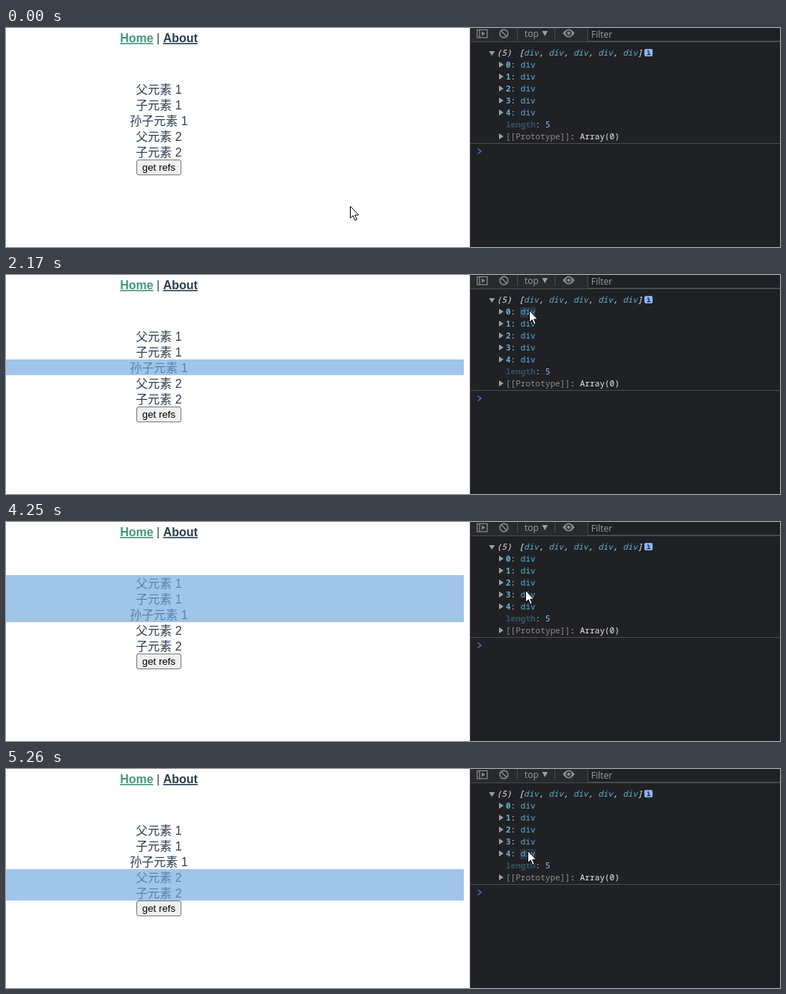
An HTML page that plays this animation: 1033x293 px, repeating every 5990 ms.

```html
<!DOCTYPE html>
<html lang="zh">
<head>
<meta charset="utf-8">
<title>get refs</title>
<style>
  html, body { margin: 0; width: 100%; height: 100%; overflow: hidden; background: #fff; }
  svg { display: block; }
  text { white-space: pre; }
  .page { font: 16px "Liberation Sans", "Noto Sans CJK SC", "Noto Sans CJK", sans-serif; fill: #2c3e50; text-anchor: middle; }
  .link { font-weight: bold; text-decoration: underline; }
  .ui { font: 12px "Open Sans", sans-serif; fill: #9aa0a6; }
  .console { font: 11px "Noto Sans Mono", monospace; fill: #e8eaed; }
  .node { fill: #5db0d7; }
  .key { fill: #5db0d7; font-weight: bold; }
  .grey { fill: #9aa0a6; }
  .line { fill: none; stroke: #494c50; }
  .icon { fill: none; stroke: #85898e; stroke-width: 1.6; }
</style>
</head>
<body>
<svg width="1033" height="293" viewBox="0 0 1033 293">
  <g class="page">
    <text x="204" y="19"><tspan class="link" fill="#42977b">Home</tspan> | <tspan class="link">About</tspan></text>
    <g id="lines"></g>
    <rect x="174.5" y="176.5" width="59" height="20" rx="2.5" fill="#efefef" stroke="#767676"/>
    <text x="204" y="191" font-size="13.33" fill="#000">get refs</text>
  </g>
  <rect id="overlay" width="611" fill="#6fa8dc" fill-opacity=".66"/>

  <rect x="619" width="414" height="293" fill="#202124"/>
  <rect x="619" width="414" height="18" fill="#292a2d"/>
  <rect x="776.5" y="-4" width="260" height="21.5" fill="#202124" stroke="#494c50"/>
  <path class="line" d="M619.5 0V293M620 18.5H1033M682.5 0V15M732.5 0V15M620 154.5H1033"/>
  <g class="icon">
    <path d="M628.8 2.3H642.2V12.8H628.8ZM632 2V13" stroke-width="1.3"/>
    <path d="M635 4.5V10.5L639.5 7.5Z" fill="#85898e" stroke="none"/>
    <circle cx="664.5" cy="7.5" r="5.4"/>
    <path d="M660.8 3.7L668.3 11.3"/>
  </g>
  <path d="M743 7Q751-4 759 7Q751 18 743 7Z" fill="#85898e"/>
  <circle cx="751" cy="7" r="2.9" fill="#85898e" stroke="#292a2d" stroke-width="1.5"/>
  <text class="ui" x="692" y="12">top</text>
  <path class="grey" d="M715.5 4H723L719.2 11Z"/>
  <text class="ui" x="781" y="13">Filter</text>

  <rect id="hover" x="686" width="21" height="14" fill="#283443"/>
  <g class="console">
    <path class="grey" d="M644.5 31H652.5L648.5 37Z"/>
    <g font-style="italic">
      <text x="655" y="37">(5)</text>
      <text id="preview" x="684.5" y="37"></text>
    </g>
    <rect x="852" y="28" width="11" height="10" rx="2" fill="#8ab4f8"/>
    <path d="M856 31.8H858V35.7M855.5 35.7H860M857 29.3V30.5" fill="none" stroke="#202124" stroke-width="1.2"/>
    <g id="rows"></g>
    <text x="667" y="133"><tspan class="key" opacity=".6" fill-opacity=".6">length</tspan>: <tspan fill="#9abbf5">5</tspan></text>
    <path class="grey" d="M658 141V149L664 145Z"/>
    <text x="667" y="149"><tspan fill="#918b98">[[Prototype]]</tspan>: Array(0)</text>
  </g>
  <path d="M629.5 161.5L634 165L629.5 168.5" fill="none" stroke="#4079d0" stroke-width="1.5"/>
  <path id="cursor" d="M.5 .5V16.5L4.2 13L6.8 19.3L9.3 18.2L6.7 12.2H11.6Z" fill="#fff" stroke="#000"/>
</svg>
<script>
const LOOP = 5990, LAG = 70, ROW_TOP = 41, ROW_HEIGHT = 16;
const $ = id => document.getElementById(id);

$('lines').innerHTML = ['父元素 1', '子元素 1', '孙子元素 1', '父元素 2', '子元素 2']
  .map((label, i) => `<text x="204" y="${88 + 21 * i}">${label}</text>`).join('');
const node = '<tspan class="node">div</tspan>';
$('preview').innerHTML = `[${Array(5).fill(node).join(', ')}]`;
$('rows').innerHTML = [0, 1, 2, 3, 4].map(i => {
  const y = 49 + ROW_HEIGHT * i;
  return `<path class="grey" d="M658 ${y - 4}v8l6-4Z"/>
    <text x="667" y="${y + 4}"><tspan class="key">${i}</tspan>: ${node}</text>`;
}).join('');

// Page area (top, bottom) of the element behind each console row
const areas = [[113, 134], [92, 134], [71, 134], [155, 176], [134, 176]];

// Bursts of pointer movement: start ms, ms per step, waypoints [step, x, y]
const bursts = [
  [0, 70, [[1, 459, 238]]],
  [250, 78, [[1, 458, 241], [2, 450, 230], [4, 415, 185], [7, 360, 122], [8, 339, 107]]],
  [860, 91, [[1, 318, 98], [3, 266, 78], [4, 260, 70], [5, 280, 61], [7, 364, 51]]],
  [1480, 70, [[1, 420, 45], [4, 600, 35], [7, 672, 41], [8, 690, 45], [9, 696, 47]]],
  [2170, 70, [[1, 698, 47]]],
  [2570, 70, [[1, 698, 45], [2, 698, 42], [4, 698, 58], [5, 698, 62], [6, 698, 60]]],
  [3380, 66, [[1, 698, 65], [2, 698, 71], [4, 698, 77]]],
  [4170, 73, [[1, 696, 84], [2, 693, 91], [4, 691, 97]]],
  [4980, 70, [[1, 691, 97], [3, 694, 106], [5, 696, 109]]],
];

function pointerAt(t) {
  const [start, period, path] = bursts.findLast(b => b[0] <= t) || bursts[0];
  const step = Math.floor((t - start) / period) + 1;
  const next = path.findIndex(p => p[0] >= step);
  if (next < 0) return path.at(-1).slice(1);
  const b = path[next], a = path[next - 1] || b;
  const f = a === b ? 0 : (step - a[0]) / (b[0] - a[0]);
  return [1, 2].map(i => Math.round(a[i] + (b[i] - a[i]) * f));
}

function rowAt([x, y]) {
  const row = Math.floor((y - ROW_TOP) / ROW_HEIGHT);
  return x >= 686 && x < 707 && areas[row] ? row : -1;
}

function draw(t) {
  const pointer = pointerAt(t);
  $('cursor').setAttribute('transform', `translate(${pointer})`);
  // The page overlay trails the pointer by one step
  const row = rowAt(pointerAt(t - LAG));
  const [top, bottom] = areas[row] || [0, 0];
  $('overlay').setAttribute('y', top);
  $('overlay').setAttribute('height', bottom - top);
  $('hover').setAttribute('y', 59 + ROW_HEIGHT * (row - 1));
  $('hover').setAttribute('visibility', row >= 0 && row === rowAt(pointer) ? 'visible' : 'hidden');
}

const begin = performance.now();
function tick() {
  draw((performance.now() - begin) % LOOP);
  requestAnimationFrame(tick);
}
tick();
</script>
</body>
</html>
```
